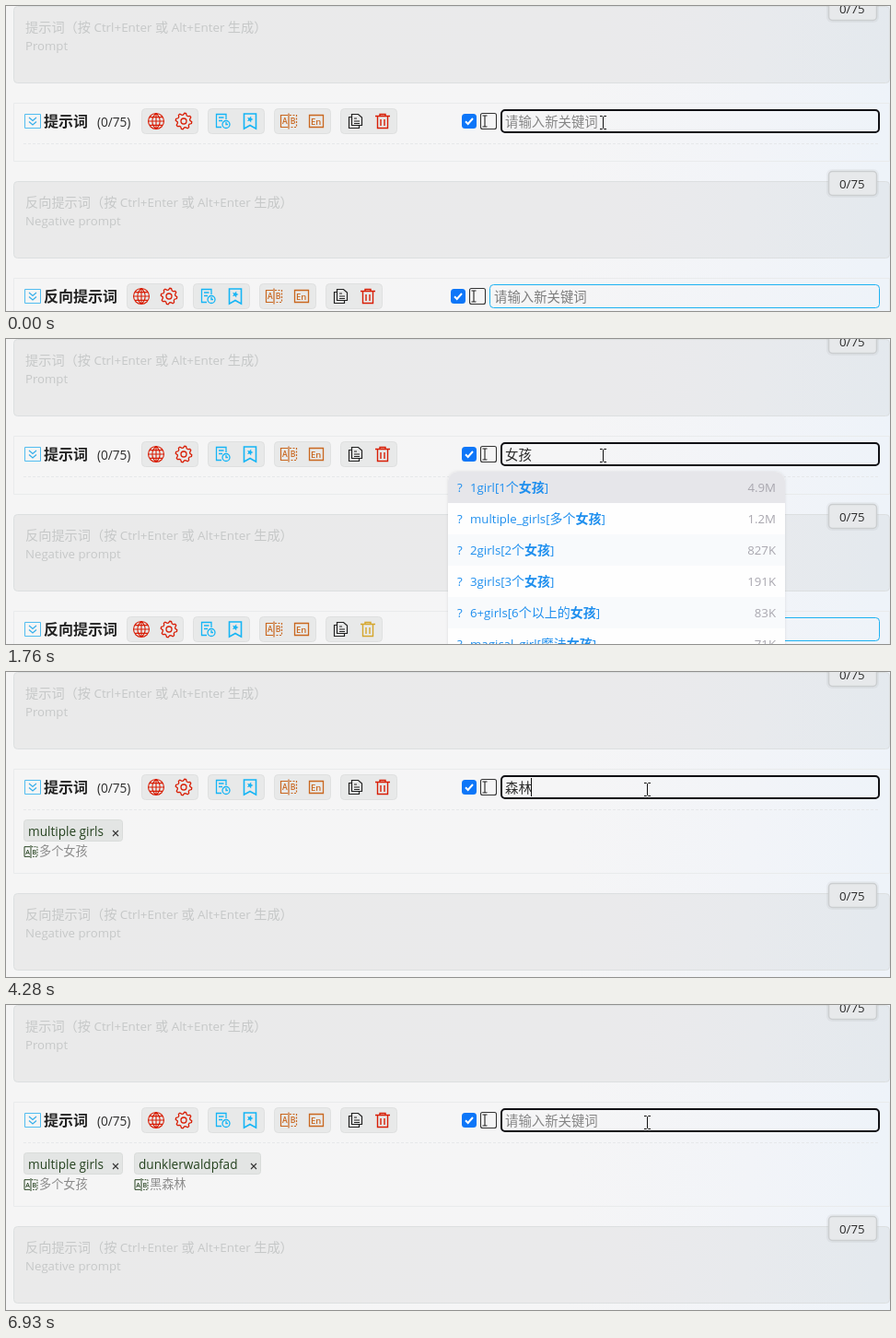
An HTML page with a canvas that plays this animation: 960 by 331 pixels, repeating every 7000 ms.

```html
<!DOCTYPE html>
<html lang="zh">
<head>
<meta charset="utf-8">
<title>Prompt keywords</title>
<style>
html, body { margin: 0; width: 100%; height: 100%; overflow: hidden; background: #f5f5f5; }
canvas { display: block; }
</style>
</head>
<body>
<canvas id="stage" width="960" height="331"></canvas>
<script>
const ctx = document.getElementById('stage').getContext('2d');
const LOOP = 7000;
const BLUE = '#1f8fee', RED = '#b4161b', PURPLE = '#a13ec6';
const CYAN = '#15b5f5', ICON_RED = '#d81e06', ORANGE = '#c9671f', BLACK = '#222';
const IME_CYAN = '#4fece4', IME_YELLOW = '#ffc62e';

// Dropdown menus: left edge, matched text, rows of label, count, colour
const menus = {
  n: { left: 502, match: 'n', rows: [['navel[肚脐]', '1.1M'], ['nail_polish[指甲油]', '257K'], ['necktie[领带]', '411K'],
    ['neckerchief[领巾]', '185K'], ['night[夜晚]', '142K'], ['no_humans[没有人]', '118K']] },
  nv: { left: 357, match: 'nv', rows: [['envelope[信封]', '14K'], ['convenient_censoring[方便的遮挡]', '13K'],
    ['convenience_store[便利店]', '3.1K'], ['invisible_chair[隐形的椅子]', '2.6K'], ['canvas_(object)[画布]', '2.2K'], ['anvil[铁砧]', '526']] },
  girl: { left: 480, match: '女孩', rows: [['1girl[1个女孩]', '4.9M'], ['multiple_girls[多个女孩]', '1.2M'], ['2girls[2个女孩]', '827K'],
    ['3girls[3个女孩]', '191K'], ['6+girls[6个以上的女孩]', '83K'], ['magical_girl[魔法女孩]', '71K']] },
  s: { left: 502, match: 's', rows: [['solo[单人]', '4.1M'], ['smile[微笑]', '2.3M'], ['short_hair[短毛短毛猫]', '1.5M'],
    ['skirt[裙子]', '1.1M'], ['simple_background[简单的背景]', '1.0M'], ['shirt[只有衬衫衬衫]', '957K']] },
  se: { left: 401, match: 'se', rows: [['serafuku[水手服]', '296K'], ['see-through[透视]', '165K'], ['semi-rimless_eyewear[半框眼镜]', '69K'],
    ['seiza[正坐]', '37K'], ['serious[严肃]', '22K'], ['seashell[贝壳]', '13K']] },
  forest: { left: 493, match: '森林', rows: [['timber_(7158)[森林人]', '346', RED], ['dunklerwaldpfad[黑森林]', '303', PURPLE],
    ['lake_forest_legend[湖畔森林传说]', '194', RED], ['cour_de_lumiere[光庭森林]', '113'],
    ['hinoma_(forest_village)[hinoma（森林村）]', '110', RED], ['panda_forest_military_uniform[熊猫森林军装]', '75']] }
};

const ime = (keys, right, ...words) => ({ keys, right, words });
const senlin = ['森林', '森林里', '森林公园', '森'];

// Each step patches the state from its time on
const steps = [
  [0, { value: '', caret: false, ime: null, menu: null, row: -1, tags: 0, mouse: [648.5, 126.5], trash: ICON_RED }],
  [340, { value: 'n', ime: ime('n', 829, '你', '年', '那', '能', '呢'), caret: true }],
  [540, { ime: ime('nv', 829, '女', '女儿', '女人', '女的'), menu: 'n' }],
  [610, { value: 'nv' }],
  [670, { ime: ime('nvh', 934, '女孩', '女孩子', '女皇', '女红', '女护士'), menu: 'nv' }],
  [740, { value: 'nvh' }],
  [810, { ime: ime('nvha', 934, '女孩', '女孩子', '女孩儿', '女汉子', '女') }],
  [870, { ime: ime('nvhai', 934, '女孩', '女孩子', '女孩儿', '女还', '女'), value: 'nvha' }],
  [940, { value: 'nvhai', menu: null, trash: '#d5a62c' }],
  [1030, { ime: null }],
  [1100, { value: '女孩' }],
  [1300, { menu: 'girl' }],
  [1630, { caret: false }],
  [1760, { row: 0 }],
  [1960, { row: 1 }],
  [2160, { caret: true }],
  [2690, { caret: false }],
  [2760, { value: 'multiple girls, ', caret: true, menu: null, row: -1 }],
  [3090, { value: '', tags: 1, mouse: [696.5, 127.5] }],
  [3290, { value: 's', ime: ime('s', 829, '是', '说', '上', '所', '三') }],
  [3490, { ime: ime('se', 829, '色', '涩', '瑟', '塞', '色号'), menu: 's' }],
  [3620, { value: 'se', ime: ime('sen', 937, '森', '十二年', '素儿柠', '双耳囊', 'sender') }],
  [3750, { value: 'sen', ime: ime('senl', 888, ...senlin), menu: 'se' }],
  [3820, { value: 'senl', ime: ime('senli', 888, ...senlin) }],
  [3880, { value: 'senli', ime: ime('senlin', 888, ...senlin) }],
  [3950, { value: 'senlin', menu: null }],
  [4210, { ime: null }],
  [4280, { value: '森林' }],
  [4480, { menu: 'forest' }],
  [4810, { caret: false }],
  [4940, { row: 0 }],
  [5140, { row: 1 }],
  [5340, { caret: true }],
  [5610, { row: 2 }],
  [5870, { caret: false }],
  [6000, { row: 1 }],
  [6400, { value: 'dunklerwaldpfad, ', caret: true, menu: null, row: -1 }],
  [6730, { value: '', tags: 2 }],
  [6930, { caret: false }]
];

const stateAt = t => Object.assign({}, ...steps.filter(s => s[0] <= t).map(s => s[1]));

// Draws mixed Chinese and Latin text and returns its right end
function text(s, x, y, size, color, weight = 400, visible = true) {
  ctx.fillStyle = color;
  for (const run of s.match(/[\u2e80-\uffef]+|[^\u2e80-\uffef]+/g) || []) {
    const cjk = run.charCodeAt(0) >= 0x2e80;
    ctx.font = cjk ? `${weight} ${size}px "Noto Sans CJK SC", "Noto Sans CJK", sans-serif`
      : `${weight} ${size * 0.945}px "Open Sans", "Noto Sans", sans-serif`;
    if (visible) ctx.fillText(run, x, y);
    x += ctx.measureText(run).width;
  }
  return x;
}

function textRight(s, right, y, size, color) {
  text(s, right - text(s, 0, 0, size, color, 400, false), y, size, color);
}

function box(x, y, w, h, r, fill, stroke, line = 1) {
  ctx.beginPath();
  ctx.roundRect(x, y, w, h, r);
  if (fill) { ctx.fillStyle = fill; ctx.fill(); }
  if (stroke) { ctx.strokeStyle = stroke; ctx.lineWidth = line; ctx.stroke(); }
}

function path(x, y, d, color, line = 1.2, filled = false) {
  ctx.save();
  ctx.translate(x, y);
  const p = new Path2D(d);
  if (filled) { ctx.fillStyle = color; ctx.fill(p); }
  else { ctx.strokeStyle = color; ctx.lineWidth = line; ctx.stroke(p); }
  ctx.restore();
}

function shadow(color, blur, dy = 0) {
  ctx.shadowColor = color;
  ctx.shadowBlur = blur;
  ctx.shadowOffsetY = dy;
}

const circle = r => `M${-r} 0A${r} ${r} 0 1 1 ${r} 0A${r} ${r} 0 1 1 ${-r} 0Z`;
const polygon = (n, radius) => 'M' + Array.from({ length: n }, (_, i) => {
  const a = (i + 0.5) / n * Math.PI * 2 - Math.PI / 2, r = radius(i);
  return `${(r * Math.cos(a)).toFixed(2)} ${(r * Math.sin(a)).toFixed(2)}`;
}).join('L') + 'Z';
const gear = polygon(32, i => i % 4 < 2 ? 8.8 : 6.9) + circle(3);
const star = polygon(10, i => i % 2 ? 1.7 : 3.6);

function translateIcon(x, y, color, k = 1) {
  ctx.save();
  ctx.translate(x, y);
  ctx.scale(k, k);
  path(0, 0, 'M-1-6.5H-8.5V6.5H-1M0-8.5V8.5', color);
  ctx.setLineDash([2, 1.5]);
  path(0, 0, 'M1-6.5H8.5V6.5H1', color);
  ctx.restore();
  text('A', x - 7 * k, y + 3.2 * k, 9 * k, color, 600);
  text('B', x + 1.8 * k, y + 3.2 * k, 9 * k, color, 600);
}

function toolbar(x, y, trash) {
  for (let i = 0; i < 4; i++) box(x + i * 72 + 0.5, y - 13.5, 61, 27, 4, '#e8e9e9', '#dfe0e0');
  path(x + 16, y, circle(8.5) + 'M-8.5 0H8.5M0-8.5V8.5M0-8.5C-5.5-4-5.5 4 0 8.5C5.5 4 5.5-4 0-8.5M-7.2-4.4H7.2M-7.2 4.4H7.2', ICON_RED, 1.1);
  path(x + 46, y, gear, ICON_RED, 1.3);
  path(x + 88, y, 'M4-2V-7.5H-6.5V6.5H-1M-4-4H1.5M-4-.5H0M8 3.5A4 4 0 1 1 0 3.5A4 4 0 1 1 8 3.5M4 1V3.5H6', CYAN, 1.3);
  path(x + 118, y, 'M-6.5-8H6.5V8.2L0 4.5L-6.5 8.2Z', CYAN, 1.6);
  path(x + 118, y - 2, star, CYAN, 1, true);
  translateIcon(x + 160, y, ORANGE);
  path(x + 190, y, 'M-7.5-6.5H7.5V6.5H-7.5Z', ORANGE, 1.3);
  text('En', x + 183.9, y + 3.7, 10, ORANGE, 600);
  path(x + 232, y, 'M-3.5-7.5H3.5L7.5-4V4.5H-3.5ZM-3.5-4.5H-6.5V7.5H4.5V4.5M-1-3H2M-1 0H5M-1 2.5H5', BLACK);
  path(x + 262, y, 'M-8-5.5H8M-3-5.5V-7.5H3V-5.5M-5.5-5.5V7.5H5.5V-5.5M-2-2V5M2-2V5', trash, 1.4);
}

function header(title, y, toolX, checkX, trash) {
  path(29, y, 'M-8.5-7.5H8.5V7.5H-8.5Z', '#52bdf0', 1);
  path(29, y, 'M-4-4L0-.5L4-4M-4 .5L0 4L4 .5', '#35aeea', 1.2);
  text(title, 41, y + 6, 16, BLACK, 700);
  toolbar(toolX, y, trash);
  box(checkX, y - 8, 16, 16, 3.5, '#0d76f8');
  path(checkX + 8, y, 'M-4 .2L-1.3 3L4-3', '#fff', 2);
  box(checkX + 20.5, y - 8.5, 17, 17, 2, null, '#333', 1.1);
  path(checkX + 25, y, 'M-2.5-6H2.5M0-6V6M-2.5 6H2.5', '#222', 1.1);
}

function textarea(y, title, caption) {
  box(8.5, y + 0.5, 951, 83, 4, 'rgba(0,0,0,.045)', '#dcdfe0');
  text(title, 21, y + 28, 14.2, '#c6c8c8');
  text(caption, 21, y + 48, 14, '#c6c8c8');
  box(891, y - 13, 57, 31, 6, 'rgba(0,0,0,.04)');
  box(893.5, y - 10.5, 52, 26, 4, '#e7e9eb', '#cbced0', 1.5);
  text('0/75', 905, y + 8, 14, '#2b2b2b');
}

function tag(x, w, label, meaning) {
  box(x + 0.5, 160.5, w - 1, 23, 3, '#e3e5e4', '#d9dcda');
  text(label, x + 5, 178, 14.4, '#25421f');
  path(x + w - 8, 175, 'M-3-3L3 3M3-3L-3 3', '#333', 1.1);
  translateIcon(x + 8, 195, '#25421f', 0.82);
  text(meaning, x + 17, 199, 13.2, '#8c8c8c');
}

function dropdown({ left, match, rows }, selected) {
  const right = 846, top = 144;
  ctx.save();
  shadow('rgba(0,0,0,.1)', 3);
  box(left, top, right - left, 220, 11, '#fff');
  shadow('transparent', 0);
  ctx.clip();
  rows.forEach(([label, count, color = BLUE], i) => {
    const y = top + i * 34;
    ctx.fillStyle = i === selected ? '#e6e6ea' : i % 2 ? '#fefefe' : '#f8fafc';
    ctx.fillRect(left, y, right - left, 34);
    text('?', left + 10, y + 22, 14, color);
    const at = label.indexOf(match), end = at + match.length;
    let x = text(label.slice(0, at), left + 24, y + 22, 14, color);
    x = text(match, x, y + 22, 14, color, 700);
    text(label.slice(end), x, y + 22, 14, color);
    textRight(count, right - 10, y + 22, 14, '#a9a7af');
  });
  ctx.restore();
}

function imePanel({ keys, right, words }) {
  const left = 545, top = 134;
  const fill = ctx.createLinearGradient(0, top, 0, 209);
  fill.addColorStop(0, '#2d3234');
  fill.addColorStop(1, '#222729');
  shadow('rgba(0,0,0,.9)', 6, 1);
  box(left, top, right - left, 75, 9, fill);
  shadow('transparent', 0);
  box(left + 0.5, top + 0.5, right - left - 1, 74, 8.5, null, '#15181a');
  ctx.fillStyle = '#3c4345';
  ctx.fillRect(left + 11, 171, right - left - 20, 1);
  const glow = ctx.createLinearGradient(left + 60, 0, right - 90, 0);
  glow.addColorStop(0, 'rgba(70,215,215,0)');
  glow.addColorStop(0.6, 'rgba(70,215,215,.9)');
  glow.addColorStop(1, 'rgba(70,215,215,0)');
  ctx.fillStyle = glow;
  ctx.fillRect(left + 60, 206, right - left - 150, 1);
  const end = text(keys, 561, 161, 16, IME_CYAN);
  ctx.fillRect(Math.floor(end), 148, 1, 16);
  path(right - 38, 156, circle(9.5), '#f0eee6', 1, true);
  let x = 561;
  words.forEach((word, i) => {
    x = text(`${i + 1}.${word}`, x, 193, 16, i ? IME_YELLOW : IME_CYAN) + 13.5;
  });
  path(right - 30, 187.5, 'M3-5V5L-3 0Z', '#6a6450', 1, true);
  path(right - 18, 187.5, 'M-3-5V5L3 0Z', IME_YELLOW, 1, true);
}

function background() {
  const g = ctx.createLinearGradient(0, 0, 960, 60);
  g.addColorStop(0, '#f5f5f5');
  g.addColorStop(0.65, '#f5f5f6');
  g.addColorStop(0.85, '#f2f4f8');
  g.addColorStop(1, '#eef3f9');
  ctx.fillStyle = g;
  ctx.fillRect(0, 0, 960, 331);
}

function section(y, h) {
  box(8.5, y + 0.5, 951, h, 0, null, '#e9ebec');
  ctx.save();
  ctx.setLineDash([3, 2]);
  path(0, y + 44.5, 'M19 0H949', '#e6e8ea', 1);
  ctx.restore();
}

function draw(t) {
  const s = stateAt(t), shift = s.tags ? 50 : 0;
  background();
  textarea(0, '提示词（按 Ctrl+Enter 或 Alt+Enter 生成）', 'Prompt');
  section(105, 63 + shift);
  header('提示词', 125, 147, 495, ICON_RED);
  text('(0/75)', 99, 131, 14.4, '#2b2b2b');
  box(538, 113, 410, 24, 4, null, '#101014', 2);
  const end = text(s.value || '请输入新关键词', 542, 131, 14.4, s.value ? '#2b2b2b' : '#858585');
  if (s.caret) {
    ctx.fillStyle = '#111';
    ctx.fillRect(s.value ? Math.floor(end) : 542, 115, 1, 20);
  }
  if (s.tags > 0) tag(19, 108, 'multiple girls', '多个女孩');
  if (s.tags > 1) tag(139, 138, 'dunklerwaldpfad', '黑森林');

  textarea(190 + shift, '反向提示词（按 Ctrl+Enter 或 Alt+Enter 生成）', 'Negative prompt');
  if (!shift) {
    section(295, 63);
    header('反向提示词', 315, 131, 483, s.trash);
    box(525.5, 302.5, 423, 25, 4, null, '#1db2f2');
    text('请输入新关键词', 530, 321, 14.4, '#7d7d7d');
  }

  if (s.menu) dropdown(menus[s.menu], s.row);
  if (s.ime) imePanel(s.ime);
  path(...s.mouse, 'M-3.5-7H-1L0-6L1-7H3.5M0-6V6M-3.5 7H-1L0 6L1 7H3.5', '#111', 1);
}

const start = performance.now();
function tick() {
  draw((performance.now() - start) % LOOP);
  requestAnimationFrame(tick);
}
tick();
</script>
</body>
</html>
```
